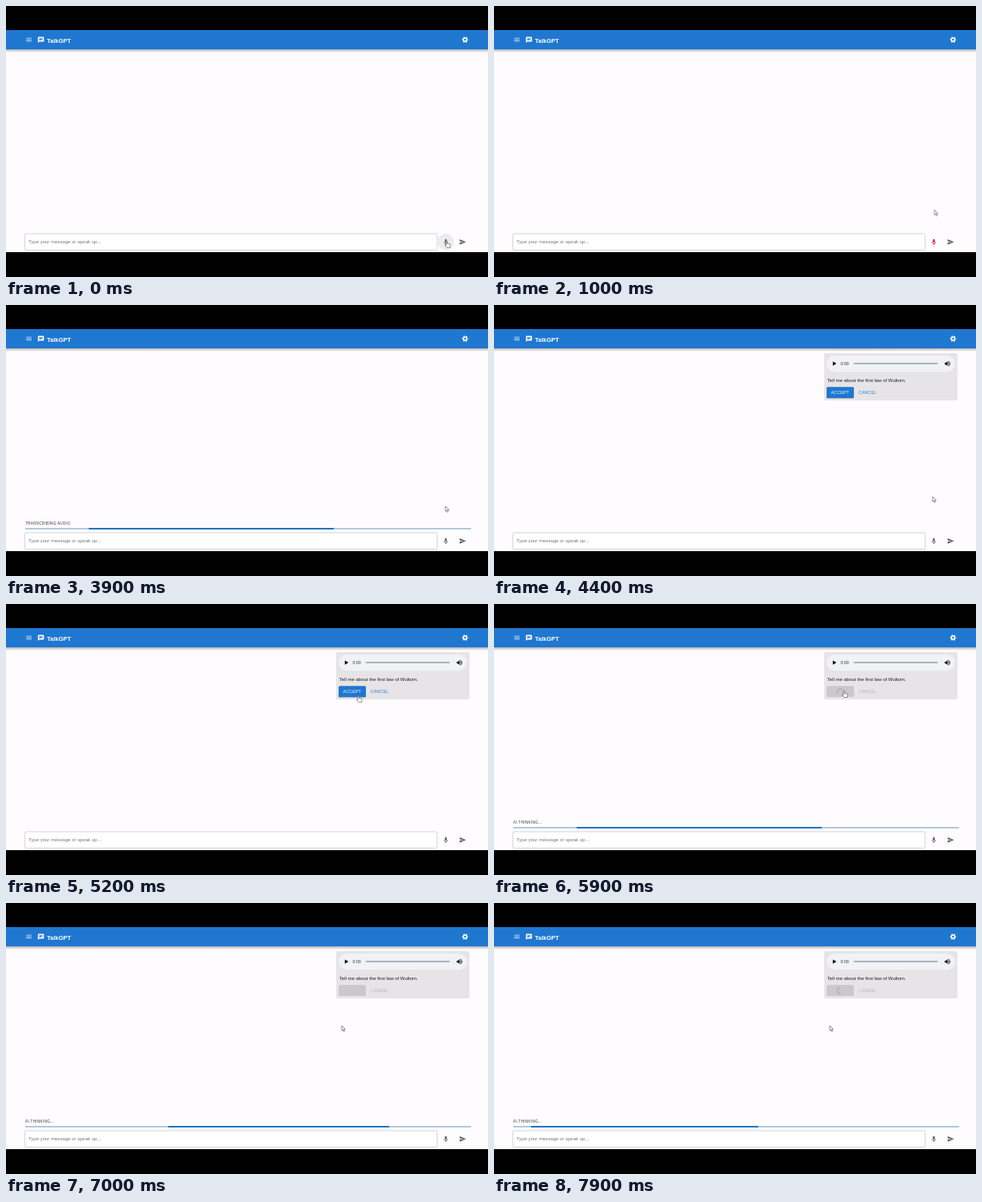
An HTML page that plays this animation: 600 px wide and 338 px high, repeating every 8000 ms.

```html
<!DOCTYPE html>
<html lang="en">
<head>
<meta charset="utf-8">
<title>TalkGPT</title>
<style>
html, body { margin: 0; width: 100%; height: 100%; overflow: hidden; background: #000; }
.stage { position: relative; width: 600px; height: 338px; overflow: hidden; }
.stage > svg { position: absolute; left: 0; top: 0; }
text { font-family: "Liberation Sans", Arial, sans-serif; font-size: 6px; }
.title { font-size: 7.5px; font-weight: 700; fill: #fff; }
.btn { font-size: 5.25px; letter-spacing: .15px; }
.label { font-size: 4.5px; letter-spacing: .375px; fill: #333; }
.badge text { font-size: 4.5px; fill: #fff; text-anchor: middle; }

/* Scene switches */
.show { visibility: hidden; animation: 8s step-end infinite; }
.transcribing { animation-name: transcribing; }
.thinking { animation-name: thinking; }
.working { animation-name: working; }
.card { animation-name: card; }
.ready { animation-name: ready; }
.rec { animation-name: rec; }
.idle { animation-name: idle; }
.sec0 { animation-name: sec0; }
.sec1 { animation-name: sec1; }
.hand { animation-name: hand; }
.arrow { animation-name: arrow; }
@keyframes transcribing { 43.5% { visibility: visible } 55%, 100% { visibility: hidden } }
@keyframes thinking { 68.5%, 100% { visibility: visible } }
@keyframes working {
  43.5% { visibility: visible } 55% { visibility: hidden } 68.5%, 100% { visibility: visible }
}
@keyframes card { 55%, 100% { visibility: visible } }
@keyframes ready { 55% { visibility: visible } 68.5%, 100% { visibility: hidden } }
@keyframes rec { 12% { visibility: visible } 43.5%, 100% { visibility: hidden } }
@keyframes idle { 0% { visibility: visible } 12% { visibility: hidden } 43.5%, 100% { visibility: visible } }
@keyframes sec0 { 12% { visibility: visible } 25%, 100% { visibility: hidden } }
@keyframes sec1 { 25% { visibility: visible } 43.5%, 100% { visibility: hidden } }
@keyframes hand {
  0% { visibility: visible } 6.5% { visibility: hidden }
  32.5% { visibility: visible } 44.5% { visibility: hidden }
  63.5% { visibility: visible } 78%, 100% { visibility: hidden }
}
@keyframes arrow {
  0% { visibility: hidden } 6.5% { visibility: visible }
  32.5% { visibility: hidden } 44.5% { visibility: visible }
  63.5% { visibility: hidden } 78%, 100% { visibility: visible }
}

.hover { animation: hover 8s linear infinite; }
@keyframes hover {
  0%, 6.5% { opacity: 1 } 8.5%, 32.5% { opacity: 0 }
  34.5%, 44.5% { opacity: 1 } 46.5%, 100% { opacity: 0 }
}
.badge { transform-origin: 547.7px 300px; animation: pop 8s ease-in-out infinite; }
@keyframes pop { 0%, 12% { transform: scale(0) } 14.8%, 100% { transform: none } }

.cursor { animation: move 8s ease-in-out infinite; }
@keyframes move {
  0%, 5% { transform: translate(548px, 293px) }
  11% { transform: translate(548px, 254px) }
  15%, 23.5% { transform: translate(549px, 255px) }
  26.25% { transform: translate(550px, 264px) }
  30% { transform: translate(550px, 272px) }
  34%, 43.5% { transform: translate(548px, 293px) }
  48.75% { transform: translate(547px, 251px) }
  54.5%, 57% { transform: translate(546px, 239px) }
  64%, 68% { transform: translate(438px, 114px) }
  71%, 76.5% { transform: translate(435px, 108px) }
  84%, 100% { transform: translate(418px, 153px) }
}

/* Indeterminate progress; the cycle begins when transcribing starts */
.track { position: absolute; left: 24px; top: 278px; width: 555px; height: 2px;
  overflow: hidden; background: #afc9dc; }
.track i { position: absolute; top: 0; bottom: 0; background: #2574bd; }
.long { animation: long 8s cubic-bezier(.65, .815, .735, .395) -4.52s infinite; }
.short { animation: short 8s cubic-bezier(.165, .84, .44, 1) -4.52s infinite; }
@keyframes long {
  0%, 25%, 51.25% { left: -35%; right: 100% }
  15.75%, 24.99%, 40.75%, 51.24%, 67%, 100% { left: 100%; right: -90% }
}
@keyframes short {
  0%, 39.375% { left: -200%; right: 100% }
  55.125%, 100% { left: 107%; right: -8% }
}

/* Button spinner; the cycle begins when the request is sent */
.spin { animation: spin 8s linear -2.52s infinite; }
.dash { animation: dash 8s ease-in-out -2.52s infinite; }
@keyframes spin { to { transform: rotate(2057.14deg) } }
@keyframes dash {
  0%, 17.5%, 35% { stroke-dasharray: 1 200; stroke-dashoffset: 0 }
  8.75%, 26.25% { stroke-dasharray: 100 200; stroke-dashoffset: -15 }
  17.49%, 34.99%, 100% { stroke-dasharray: 100 200; stroke-dashoffset: -125 }
}
</style>
</head>
<body>
<div class="stage">
<svg width="600" height="338" viewBox="0 0 600 338">
  <defs>
    <linearGradient id="shade" x2="0" y2="1">
      <stop stop-color="#000" stop-opacity=".3"/>
      <stop offset="1" stop-color="#000" stop-opacity="0"/>
    </linearGradient>
    <path id="mic" d="M12 14c1.66 0 3-1.34 3-3V5c0-1.66-1.34-3-3-3S9 3.34 9 5v6c0 1.66 1.34 3 3 3zm5.3-3c0 3-2.54 5.1-5.3 5.1S6.7 14 6.7 11H5c0 3.41 2.72 6.23 6 6.72V21h2v-3.28c3.28-.48 6-3.3 6-6.72z"/>
  </defs>

  <rect y="30" width="600" height="277" fill="#fefcfe"/>
  <rect y="54" width="600" height="4" fill="url(#shade)"/>
  <rect y="30" width="600" height="24" fill="#1f77d0"/>
  <g fill="#fff">
    <path transform="translate(24 37.5) scale(.375)" fill-opacity=".85" d="M3 18h18v-2H3zm0-5h18v-2H3zm0-7v2h18V6z"/>
    <path transform="translate(39 37.7) scale(.375)" d="M20 2H4c-1.1 0-2 .9-2 2v18l4-4h14c1.1 0 2-.9 2-2V4c0-1.1-.9-2-2-2zM6 9h12v2H6zm8 5H6v-2h8zm4-6H6V6h12z"/>
  </g>
  <text class="title" x="51" y="46">TalkGPT</text>
  <g transform="translate(571.5 42) scale(.375)" fill="none" stroke="#fff">
    <circle r="5.6" stroke-width="4"/>
    <circle r="8.6" stroke-width="3" stroke-dasharray="4.8 4.206" stroke-dashoffset="2.4"/>
  </g>

  <rect x="23.4" y="284" width="513.4" height="20.4" rx="1.5" fill="#fff" stroke="#c6c5c6" stroke-width=".75"/>
  <text x="28" y="296.2" fill="#777">Type your message or speak up...</text>
  <circle class="hover" cx="547.5" cy="294" r="10.3" fill="#ececee"/>
  <g transform="translate(543 290) scale(.375)">
    <use class="show idle" href="#mic" fill="#5c5c5c"/>
    <use class="show rec" href="#mic" fill="#c5202f"/>
  </g>
  <path transform="translate(564 289.8) scale(.375)" fill="#5c5c5c" d="M2 21l21-9L2 3v7l15 2-15 2z"/>
  <g class="show rec">
    <g class="badge">
      <rect x="540" y="295.5" width="15.5" height="9" rx="4.5" fill="#c5202f"/>
      <text class="show sec0" x="547.7" y="301.7">0:00</text>
      <text class="show sec1" x="547.7" y="301.7">0:01</text>
    </g>
  </g>

  <text class="label show transcribing" x="24" y="273.6">TRANSCRIBING AUDIO</text>
  <text class="label show thinking" x="24" y="273.6">AI THINKING...</text>

  <g class="show card">
    <rect x="411" y="60" width="166" height="59" rx="1.5" fill="#e6e4e6"/>
    <rect x="414" y="63" width="160" height="20.2" rx="10.1" fill="#f1f2f4"/>
    <path d="M421.8 70.4v5.4l4.4-2.7z"/>
    <text x="431.5" y="75" fill="#333" style="font-size:5.25px">0:00</text>
    <rect x="447.5" y="72.3" width="105" height="1.4" rx=".7" fill="#93a1ae"/>
    <path transform="translate(560 68.6) scale(.375)" d="M3 9v6h4l5 5V4L7 9zm13.5 3c0-1.77-1-3.3-2.5-4v8c1.5-.7 2.5-2.2 2.5-4zM14 3.2v2.1c2.9.9 5 3.5 5 6.7s-2.1 5.8-5 6.7v2.1c4-.9 7-4.5 7-8.8s-3-7.9-7-8.8z"/>
    <text x="414.8" y="96.2" fill="#222">Tell me about the first law of Wultom.</text>
  </g>
  <g class="show ready">
    <rect x="414" y="103" width="34" height="14" rx="1.5" fill="#000" fill-opacity=".2"/>
    <rect x="414" y="102.3" width="34" height="13.8" rx="1.5" fill="#1f77d0"/>
    <text class="btn" x="419.6" y="111.1" fill="#fff">ACCEPT</text>
    <text class="btn" x="454" y="111.1" fill="#2b7ccb">CANCEL</text>
  </g>
  <g class="show thinking">
    <rect x="414" y="102.3" width="34" height="13.8" rx="1.5" fill="#cac8ca"/>
    <g transform="translate(431 109.2) scale(.185)">
      <g class="spin">
        <circle class="dash" r="20.2" fill="none" stroke="#999799" stroke-width="3.8"/>
      </g>
    </g>
    <text class="btn" x="454" y="111.1" fill="#b3b1b3">CANCEL</text>
  </g>

  <g class="cursor" fill="#fff" stroke="#444" stroke-width=".6" stroke-linejoin="round">
    <path class="show arrow" d="M0 0V6.3L1.4 5 2.5 7.4 3.5 6.9 2.5 4.6H4.5z"/>
    <path class="show hand" d="M0 .6Q.7-.4 1.3.6V3.2L4.4 3.8Q5.2 4 5.1 5L4.6 8.6H1L-1.5 5.4Q-1.4 4.4 0 5.4z"/>
  </g>
</svg>
<div class="track show working"><i class="long"></i><i class="short"></i></div>
</div>
</body>
</html>
```
